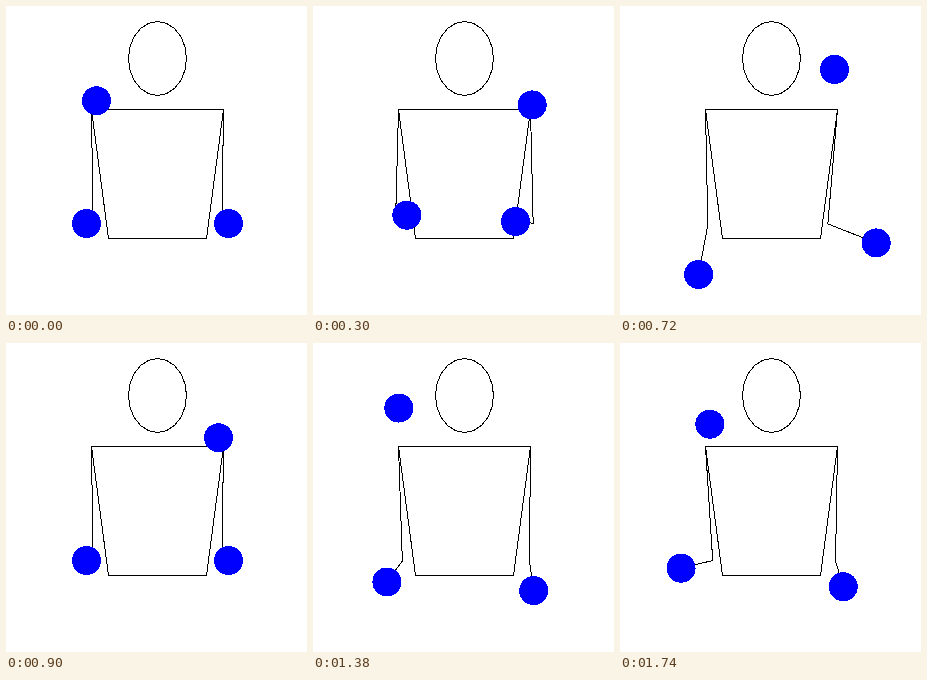
An HTML page for the animation above (1800 ms loop, 301 by 309 pixels).

```html
<!DOCTYPE html>
<html lang="en">
<head>
<meta charset="utf-8">
<title>Three-ball box juggling</title>
<style>
  html, body { margin: 0; width: 100%; height: 100%; overflow: hidden; background: #fff; }
  svg { display: block; shape-rendering: crispEdges; }
  .line { fill: none; stroke: #000; stroke-width: 1; }
  circle { fill: #00f; }
</style>
</head>
<body>
<svg width="301" height="309" viewBox="0 0 301 309">
  <polygon id="head" class="line"/>
  <polygon class="line" points="85.5,103.5 217.5,103.5 200.5,232.5 102.5,232.5"/>
  <polyline class="arm line"/>
  <polyline class="arm line"/>
  <circle r="14.5"/>
  <circle r="14.5"/>
  <circle r="14.5"/>
</svg>
<script>
const LOOP = 1800, HALF = LOOP / 2, STEP = 60;
const GRAVITY = 4.315e-4;
const TOSS_TIME = 1216, PASS_TIME = 316;
const LEVEL = 217.5, THROW_X = 222.5, CATCH_X = 209;
const SHOULDER = [217.5, 103.5];

// Right hand: time, x, y, and velocity at each throw and catch.
const KNOTS = [
  [0, THROW_X, LEVEL, -0.0111, -0.525],
  [PASS_TIME, CATCH_X, LEVEL, 0.048, 0.2],
  [HALF, THROW_X, LEVEL, -0.4056, -0.1363],
  [TOSS_TIME, CATCH_X, LEVEL, 0.103, 0.15],
  [LOOP, THROW_X, LEVEL, -0.0111, -0.525]
];

const wrap = t => t % LOOP;
const mirror = ([x, y]) => [303 - x, y];

function hermite(p, q, v, w, s) {
  const r = 1 - s;
  return p * r * r * (1 + 2 * s) + q * s * s * (3 - 2 * s) + v * s * r * r - w * s * s * r;
}

function hand(t) {
  const i = KNOTS.findIndex(k => k[0] > t) - 1;
  const a = KNOTS[i], b = KNOTS[i + 1], d = b[0] - a[0], s = (t - a[0]) / d;
  return [1, 2].map(n => hermite(a[n], b[n], a[n + 2] * d, b[n + 2] * d, s));
}

function flight(t, time, from) {
  return [from + (CATCH_X - from) * t / time, LEVEL - GRAVITY * t * (time - t)];
}

const column = t => t < TOSS_TIME ? flight(t, TOSS_TIME, THROW_X) : hand(t);

function passed(t) {
  if (t >= HALF) return mirror(passed(t - HALF));
  return t < PASS_TIME ? flight(t, PASS_TIME, 303 - THROW_X) : hand(t);
}

// The elbow swings against the hand, less so when the arm reaches far out.
function arm(t) {
  const [x, y] = hand(t), dx = x - SHOULDER[0];
  const swing = Math.min(0.34, 0.33 + 0.003 * (y - 225)) * (1 - 0.00018 * dx * dx);
  const elbow = [SHOULDER[0] - swing * dx, LEVEL + Math.max(0, y - 225) * 0.035];
  return [SHOULDER, elbow, [x, y]];
}

const arms = document.querySelectorAll('.arm');
const balls = document.querySelectorAll('circle');
const setPoints = (el, pts) => el.setAttribute('points', pts.map(p => p.join()).join(' '));

setPoints(document.getElementById('head'), Array.from({ length: 20 }, (_, i) => {
  const a = i * Math.PI / 10;
  return [151.5 + 29 * Math.cos(a), 52.5 + 37 * Math.sin(a)];
}));

function draw(t) {
  const other = wrap(t + HALF);
  setPoints(arms[0], arm(t));
  setPoints(arms[1], arm(other).map(mirror));
  [column(t), mirror(column(other)), passed(t)].forEach(([x, y], i) => {
    balls[i].setAttribute('cx', x);
    balls[i].setAttribute('cy', y);
  });
}

const start = performance.now();
function tick() {
  const t = wrap(performance.now() - start);
  draw(Math.floor(t / STEP) * STEP);
  requestAnimationFrame(tick);
}
tick();
</script>
</body>
</html>
```
